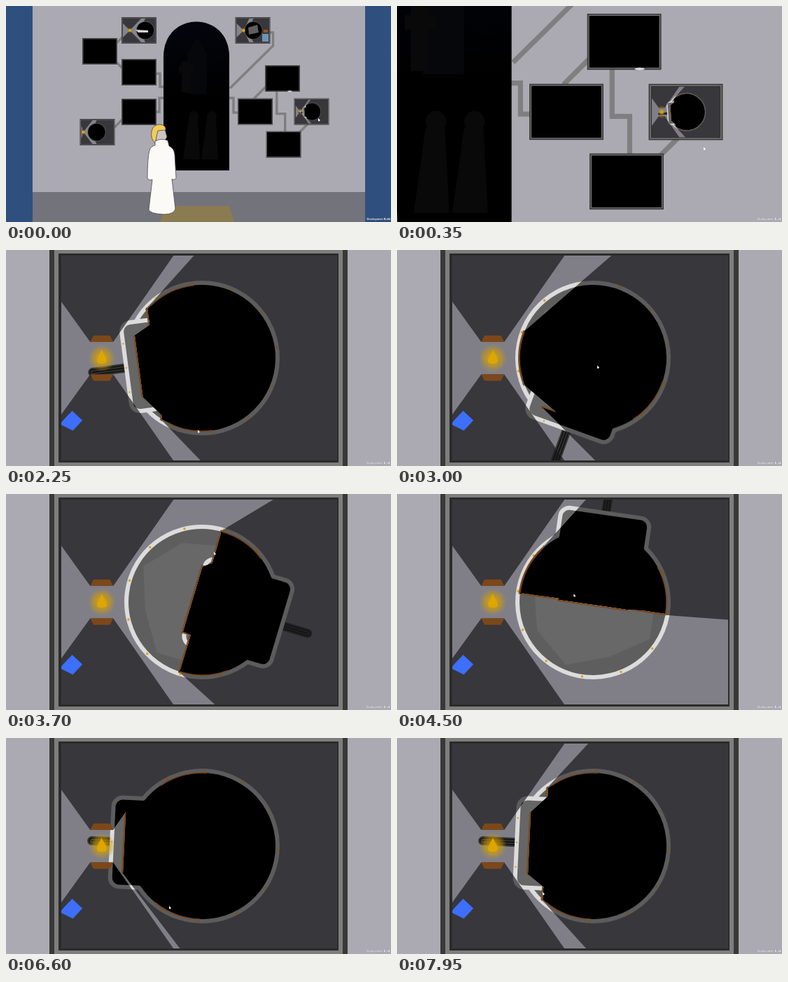
An HTML page with a canvas for the animation above (8000 ms loop, 550x310 px).

```html
<!DOCTYPE html>
<html lang="en">
<head>
<meta charset="utf-8">
<title>Light puzzle</title>
<style>
html, body { margin: 0; width: 100%; height: 100%; overflow: hidden; background: #abaab2; }
canvas { display: block; width: 550px; height: 310px; }
</style>
</head>
<body>
<canvas id="stage" width="550" height="310"></canvas>
<script>
const ctx = document.getElementById('stage').getContext('2d');
const LOOP = 8000, ZOOM = 8.52, RAD = Math.PI / 180, TAU = Math.PI * 2;
const LAMP = { x: 137, y: 155.2 }, HUB = { x: 280, y: 155 }, FOCUS = { x: 436.5, y: 151.6 };
const WALL = '#abaab2', DARK = '#38373c', LIT = '#807f88', BROWN = '#7c4819', GOLD = '#d9a400', PIPE = '#7f7f7f';

// Key points: time, value
const TURN = [[0, 176], [2250, 172.5], [3700, 16.7], [5250, -149], [6300, -177.3]];
const MOUSE_X = [[0, 446], [700, 421], [2250, 274], [3700, 297], [5250, 212], [6600, 233], [7950, 208]];
const MOUSE_Y = [[0, 161], [700, 246], [2250, 258], [3700, 83], [5250, 211], [6600, 241], [7950, 221]];

// Monotone cubic through the keys
function track(keys, t) {
  const last = keys.length - 1;
  if (t >= keys[last][0]) return keys[last][1];
  let i = 0;
  while (t >= keys[i + 1][0]) i++;
  const slope = j => j < 0 || j >= last ? 0 : (keys[j + 1][1] - keys[j][1]) / (keys[j + 1][0] - keys[j][0]);
  const tangent = j => {
    const a = slope(j - 1), b = slope(j);
    return a * b <= 0 ? 0 : 2 * a * b / (a + b);
  };
  const [t0, v0] = keys[i], [t1, v1] = keys[i + 1], h = t1 - t0, u = (t - t0) / h, w = 1 - u;
  return v0 * (1 + 2 * u) * w * w + h * tangent(i) * u * w * w
    + v1 * u * u * (3 - 2 * u) - h * tangent(i + 1) * u * u * w;
}

function ease(t, from, to) {
  const u = Math.min(1, Math.max(0, (t - from) / (to - from)));
  return u * u * (3 - 2 * u);
}

// Reach of the box: pushed out, later pulled back in
const reach = t => 112 + 20 * (ease(t, 3300, 4100) - ease(t, 6850, 7500));

// ---- drawing helpers ----
const range = (n, make) => Array.from({ length: n }, (_, i) => make(i));
const polar = (r, deg) => [r * Math.cos(deg * RAD), r * Math.sin(deg * RAD)];

function trace(pts, closed = true) {
  ctx.beginPath();
  pts.forEach(([x, y], i) => i ? ctx.lineTo(x, y) : ctx.moveTo(x, y));
  if (closed) ctx.closePath();
}
function poly(pts, fill) { trace(pts); ctx.fillStyle = fill; ctx.fill(); }
function line(pts, color, width) {
  trace(pts, false);
  ctx.strokeStyle = color; ctx.lineWidth = width; ctx.stroke();
}
function rect(x, y, w, h, fill) { ctx.fillStyle = fill; ctx.fillRect(x, y, w, h); }
function disc(x, y, r, fill) {
  ctx.beginPath(); ctx.arc(x, y, r, 0, TAU); ctx.fillStyle = fill; ctx.fill();
}
// Runs paint with the origin moved to x, y
function at(x, y, paint, scale = 1, angle = 0) {
  ctx.save();
  ctx.translate(x, y); ctx.rotate(angle); ctx.scale(scale, scale);
  paint();
  ctx.restore();
}

// ---- light ----
const shades = [-1, 1].map(s => [[-12, 32.5], [11.5, 32.5], [16.2, 23.3], [-16.7, 23.3]]
  .map(([x, y]) => [LAMP.x + x, LAMP.y + s * y]));
const bounds = [[79, 8], [473, 8], [473, 302], [79, 302]];
const loop = pts => [...pts, pts[0]];

// Light-blocking lines of the wheel: (along the box axis, across it)
function wheelLines(out) {
  const back = out - 136;
  const sides = [-1, 1].flatMap(s => [
    [[68, 82 * s], [68, 11.5 * s], [57, 11.5 * s]],
    [[-2, 106 * s], [-2, 49 * s]],
    range(12, i => polar(105, s * (48 + 4 * i)))
  ]);
  const plate = [[out - 21, -45], [out - 21, 45]];
  const rear = [[back + 45, -49], [back, -49], [back, 49], [back + 45, 49]];
  return [plate, rear, ...sides];
}

function lightArea(lines) {
  const walls = lines.flatMap(pts => pts.slice(1).map((q, i) => [pts[i], q]));
  const angles = lines.flat().flatMap(([x, y]) => {
    const a = Math.atan2(y - LAMP.y, x - LAMP.x);
    return [a - 1e-4, a, a + 1e-4];
  }).sort((a, b) => a - b);
  return angles.map(a => {
    const dx = Math.cos(a), dy = Math.sin(a);
    let near = 600;
    for (const [p, q] of walls) {
      const ex = q[0] - p[0], ey = q[1] - p[1], det = dx * ey - dy * ex;
      if (Math.abs(det) < 1e-9) continue;
      const px = p[0] - LAMP.x, py = p[1] - LAMP.y;
      const d = (px * ey - py * ex) / det, u = (px * dy - py * dx) / det;
      if (d > 0 && d < near && u >= -1e-6 && u <= 1 + 1e-6) near = d;
    }
    return [LAMP.x + dx * near, LAMP.y + dy * near];
  });
}

// ---- main picture ----
function handle(lit) {
  ctx.lineCap = 'round';
  const bar = (color, width) => line([[100, 0], [157.5, 0]], color, width);
  bar(lit ? '#34332f' : '#222223', 13);
  bar('#141414', 9);
  bar(lit ? '#45433d' : '#2a2a2b', 5);
  bar('#161616', 3);
  ctx.lineCap = 'butt';
}

function wheel(angle, out, lit) {
  const shell = lit ? '#dcdcdc' : '#5c5c5c', floor = lit ? '#666666' : '#000';
  const stud = lit ? GOLD : '#7d5510';
  const tray = () => {
    ctx.beginPath();
    ctx.roundRect(out - 133, -64, 130, 128, 13);
    ctx.fillStyle = floor; ctx.fill();
    ctx.strokeStyle = shell; ctx.lineWidth = 6; ctx.stroke();
  };
  const bowl = () => disc(0, 0, 105.5, lit ? '#5e5e5e' : floor);

  at(HUB.x, HUB.y, () => {
    handle(lit);
    if (lit) {
      bowl();
      poly(range(9, i => polar(91 + 9 * Math.sin(i * 2.4), 75 + 40 * i)), '#686868');
      tray();
    } else {
      tray();
      bowl();
    }
    ctx.beginPath();
    ctx.arc(0, 0, 108, 36 * RAD, 324 * RAD);
    ctx.strokeStyle = shell; ctx.lineWidth = 6; ctx.stroke();
    range(9, i => disc(...polar(108, 60 + 30 * i), 1.7, stud));
    if (lit) range(3, i => disc(out - 3, 35 * (i - 1), 1.2, stud));
  }, 1, angle);
}

function lamp(t) {
  const pulse = Math.sin(t / 90) * 0.6 + Math.sin(t / 53) * 0.4;
  at(LAMP.x, LAMP.y, () => {
    const r = 20 + pulse * 0.8, glow = ctx.createRadialGradient(0, 0, 1, 0, 0, r);
    glow.addColorStop(0, 'rgba(222,168,0,.95)');
    glow.addColorStop(0.6, 'rgba(205,155,10,.55)');
    glow.addColorStop(1, 'rgba(190,145,20,0)');
    disc(0, 0, r, glow);
    ctx.beginPath();
    ctx.moveTo(pulse, -12);
    ctx.bezierCurveTo(3, -5, 14, 8, 0, 8);
    ctx.bezierCurveTo(-14, 8, -3, -5, pulse, -12);
    ctx.fillStyle = '#dda600';
    ctx.fill();
  });
}

function blueMark() {
  at(95, 245, () => {
    rect(-10, -10, 20, 20, '#3d6ffa');
    poly([[-10, -4], [-10, 16], [10, 10], [4, -10]], '#3d6ffa');
  }, 1, 43 * RAD);
}

function puzzle(t) {
  const angle = track(TURN, t) * RAD, out = reach(t);
  const c = Math.cos(angle), s = Math.sin(angle);
  const parts = wheelLines(out).map(pts =>
    pts.map(([a, l]) => [HUB.x + a * c - l * s, HUB.y + a * s + l * c]));
  const area = lightArea([...parts, ...shades.map(loop), loop(bounds)]);

  rect(62, -7.3, 426, 324.6, '#383938');
  rect(69, -.5, 412, 311, '#7d7e7d');
  rect(75, 5, 400, 300, '#2b2b2c');
  ctx.save();
  trace(bounds);
  ctx.clip();
  rect(79, 8, 394, 294, DARK);
  wheel(angle, out, false);

  ctx.save();
  trace(area);
  ctx.clip();
  rect(79, 8, 394, 294, LIT);
  wheel(angle, out, true);
  for (const p of parts) line(p, BROWN, 4);
  ctx.restore();

  for (const side of [-1, 1]) {
    ctx.beginPath();
    ctx.arc(HUB.x, HUB.y, 105, angle + side * 53 * RAD, angle + side * 91 * RAD, side < 0);
    ctx.strokeStyle = '#74431a'; ctx.lineWidth = 1.6; ctx.stroke();
  }
  for (const b of shades) poly(b, BROWN);
  lamp(t);
  if (t >= 1750) blueMark();
  ctx.restore();
}

// ---- room ----
function frame(x, y, fill = '#000') {
  rect(x, y, 50, 38, '#3a3a3b');
  rect(x + .8, y + .8, 48.4, 36.4, '#777877');
  rect(x + 1.4, y + 1.4, 47.2, 35.2, fill);
}

// Small lamp-and-wheel picture
function thumb(x, y, lampX, hubX) {
  frame(x, y, DARK);
  at(x, y + 19, () => {
    for (const s of [-1, 1]) {
      poly([[2, 0], [2, 10 * s], [lampX, 0]], '#85848c');
      poly([[lampX, 0], [hubX - 6, 17 * s], [hubX, 17 * s], [hubX - 8, 0]], '#85848c');
      rect(lampX - 2, 3 * s - .6, 4, 1.2, BROWN);
    }
    disc(hubX, 0, 13, '#5c5c5c');
    disc(hubX, 0, 12.3, '#000');
    disc(lampX, 0, 2.2, GOLD);
  });
}

const pipe = (...pts) => line(pts, PIPE, 3.4);
const slant = (x, y, rise) => pipe([x - 9, y + 9 * rise], [x + 9, y - 9 * rise]);
const step = (x0, y0, mid, x1, y1) => pipe([x0, y0], [mid, y0], [mid, y1], [x1, y1]);

function pipes() {
  slant(162, 49, 1);
  slant(162, 85, -1);
  slant(162, 167, 1);
  slant(363, 124, 1);
  slant(425, 175.5, 1);
  step(214, 97, 220, 227, 116);
  step(214, 152, 219, 227, 132);
  step(332, 153, 325, 318, 132);
  pipe([377, 38], [381.5, 38], [381.5, 57], [320, 118]);
  pipe([386.8, 122], [386.8, 154.6], [398.7, 154.6], [398.7, 181]);
}

function doorway() {
  const dim = '#09090a';
  ctx.beginPath();
  ctx.moveTo(225, 236);
  ctx.lineTo(225, 73);
  ctx.bezierCurveTo(225, 5.7, 319, 5.7, 319, 73);
  ctx.lineTo(319, 236);
  const g = ctx.createLinearGradient(0, 22, 0, 130);
  g.addColorStop(0, '#03050d');
  g.addColorStop(1, '#000');
  ctx.fillStyle = g;
  ctx.fill();
  poly([[259, 126], [259, 68], [273, 45], [287, 68], [287, 126]], '#06070a');
  rect(247, 86, 21, 10, dim);
  rect(251, 80, 12, 44, dim);
  for (const x of [265, 291]) {
    disc(x + 3, 158, 7, dim);
    poly([[x - 4, 162], [x + 9, 162], [x + 12, 220], [x - 12, 220]], dim);
  }
}

function person() {
  const shape = (d, fill) => {
    const p = new Path2D(d);
    ctx.fillStyle = fill; ctx.fill(p);
    ctx.strokeStyle = '#4b4845'; ctx.lineWidth = .8; ctx.stroke(p);
  };
  at(222, 170, () => {
    shape('M-8 8 L5 7 L8 18 L4 24 H-8 Z', '#cbc5c4');
    shape('M-14 10 Q-12 0 -2 0 Q7 1 6 8 L-5 9 L-9 27 Q-16 20 -14 10 Z', '#f3cb56');
    shape('M-9 24 Q0 19 9 23 L11 31 Q18 34 19 43 L21 77 Q18 81 15 78 L20 121 Q18 129 3 129 Q-17 128 -18 122'
      + ' L-13 79 Q-18 81 -20 77 Q-20 48 -17 37 Q-15 31 -9 30 Z', '#fbfaf7');
  });
}

function room() {
  rect(-60, -60, 670, 430, '#2f4f7e');
  rect(38, -60, 475, 430, WALL);
  rect(38, 267, 475, 103, '#73737c');
  pipes();
  doorway();
  poly([[228, 287], [319, 287], [327, 312], [219, 312]], '#8b7b50');

  frame(109, 46);
  for (const y of [76, 133]) frame(165, y);
  frame(370, 85);
  frame(331, 132.5);
  frame(371.6, 179.7);
  ctx.beginPath();
  ctx.ellipse(405.4, 122.4, 3.3, .8, 0, 0, TAU);
  ctx.fillStyle = '#deded9';
  ctx.fill();

  thumb(165, 16, 12, 34);
  poly([[185, 34], [203, 35], [203, 38], [189, 38]], '#d4d4d4');
  thumb(105.5, 162, 5, 24);
  thumb(327.5, 16, 12, 26);
  rect(366, 40, 9, 11, '#6f93b5');
  rect(368, 34, 6, 4, '#9a5420');
  poly([[346, 31], [359, 27], [361, 38], [347, 41]], '#5f5f5f');
  person();
}

// ---- overlay ----
function cursor(t) {
  at(track(MOUSE_X, t), track(MOUSE_Y, t), () =>
    poly([[0, 0], [0, 4.6], [1.1, 3.7], [2.2, 5.2], [1.9, 3.4], [3.2, 3.2]], '#fff'));
}

function label() {
  at(549, 307, () => {
    ctx.font = 'bold 37px "Liberation Sans", Arial, sans-serif';
    ctx.textAlign = 'right';
    ctx.fillStyle = 'rgba(40,40,45,.6)';
    ctx.fillText('Development Build', 4, 4);
    ctx.fillStyle = '#fff';
    ctx.fillText('Development Build', 0, 0);
  }, 0.1);
}

function draw(t) {
  // Critically damped camera: view size and centre share one curve
  const x = 5.74 * t / 1000, k = t > 1650 ? 1 : 1 - (1 + x) * Math.exp(-x);
  const scale = 1 / (1 + (1 / ZOOM - 1) * k);
  at(275, 155, () => {
    ctx.translate(-275 - (FOCUS.x - 275) * k, -155 - (FOCUS.y - 155) * k);
    room();
    at(FOCUS.x, FOCUS.y, () => {
      ctx.translate(-275, -155);
      puzzle(t);
    }, 1 / ZOOM);
  }, scale);
  cursor(t);
  label();
}

function tick() {
  draw(performance.now() % LOOP);
  requestAnimationFrame(tick);
}
tick();
</script>
</body>
</html>
```
